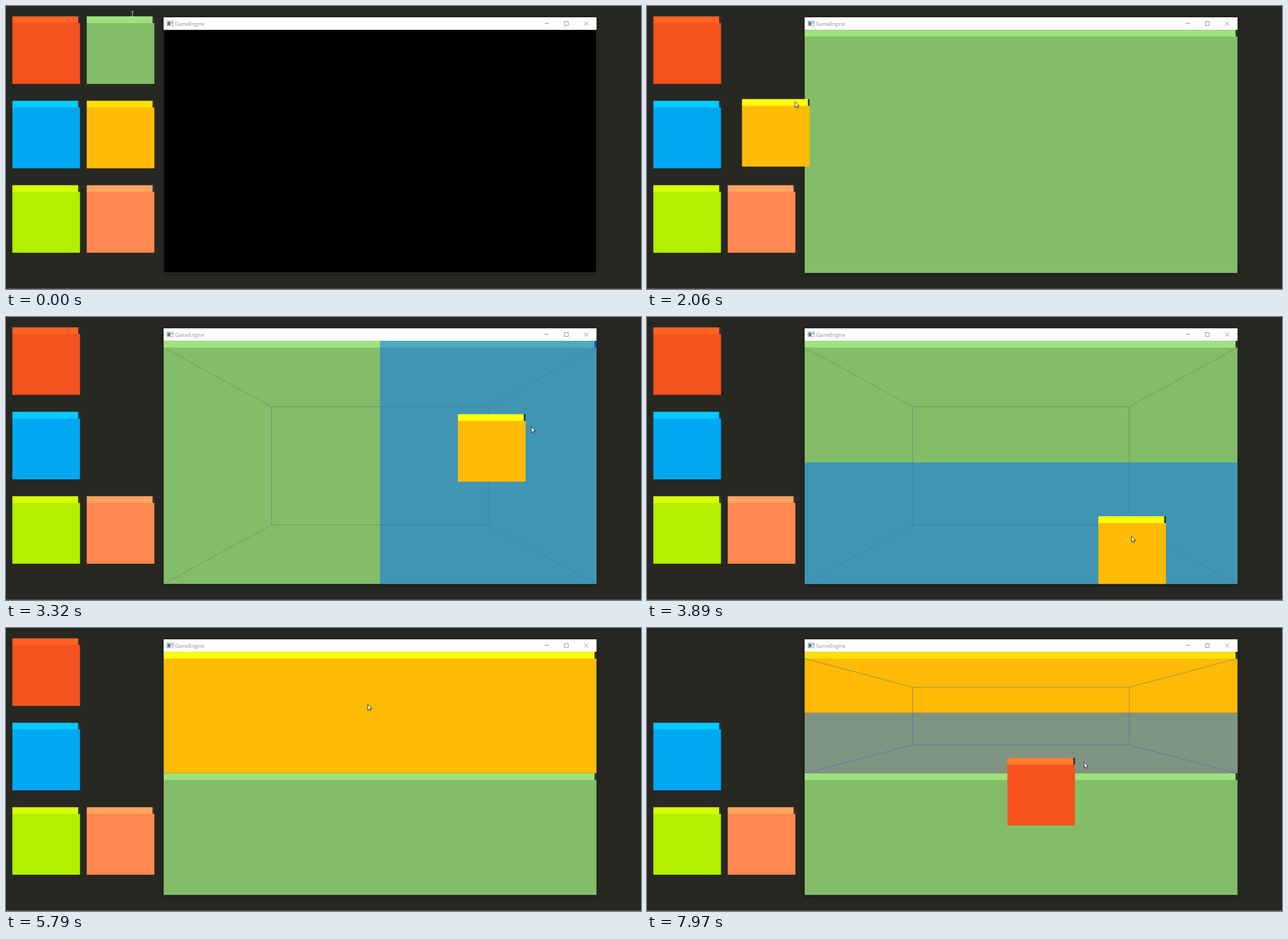
These frames come from a looping animation (1120x500 px, 8 s). An HTML page:

```html
<!DOCTYPE html>
<html lang="en">
<head>
<meta charset="utf-8">
<title>Docking panels</title>
<style>
  html, body { margin: 0; width: 100%; height: 100%; overflow: hidden; background: #272822; }
  svg { display: block; width: 1120px; height: 500px; }
  text { font: 8.7px "Open Sans", "Noto Sans", sans-serif; fill: #8c8c8c; }
</style>
</head>
<body>
<svg viewBox="0 0 1120 500">
  <defs>
    <filter id="shade" x="-5%" y="-5%" width="110%" height="112%">
      <feDropShadow dx="0" dy="2" stdDeviation="4" flood-color="#000" flood-opacity=".4"/>
    </filter>
  </defs>
  <rect width="1120" height="500" fill="#272822"/>
  <rect y="499" width="1120" height="1" fill="#60604e"/>
  <g id="shelf"></g>
  <rect x="278" y="20" width="763.5" height="452" fill="#3c3d39" filter="url(#shade)"/>
  <rect x="278.5" y="42" width="762.5" height="429" fill="#000"/>
  <rect x="278" y="20" width="763.5" height="22.2" fill="#fff"/>
  <rect x="284" y="26.5" width="11" height="8.5" fill="#fff" stroke="#8a9297" stroke-width=".8"/>
  <rect x="285" y="27.8" width="5" height="6.2" fill="#4f8587"/>
  <rect x="291.6" y="28" width="2" height="3" fill="#6f8f9f"/>
  <text x="298.3" y="34.6">GameEngine</text>
  <path d="M950 30.5h7.5M985 27.5h6.8v6.8h-6.8zM1020 27.5l7 7m0-7l-7 7" fill="none" stroke="#8a8a8a"/>
  <g id="scene"></g>
</svg>
<script>
const LOOP = 8000, LAG = 60;
const SIZE = 119.3, HEAD = 11.9, NOTCH = 3;
const LEFT = 278.1, TOP = 42.1, WIDE = 763.3, HIGH = 429.4;

// Shelf order, row by row; hover, pick and drop are times.
const panels = [
  { rgb: [245, 82, 30], hover: 6500, pick: 6620, drop: LOOP },
  { rgb: [132, 189, 104], hover: 340, pick: 410, drop: 1200 },
  { rgb: [0, 168, 243] },
  { rgb: [255, 187, 5], hover: 1630, pick: 1940, drop: 5790 },
  { rgb: [179, 240, 0] },
  { rgb: [255, 136, 80] }
];
panels.forEach((q, i) => {
  q.home = [11.2 + 131.2 * (i % 2), 18.3 + 149.15 * Math.floor(i / 2)];
});
const [red, green, , yellow] = panels;

// Pointer route: time, x, y and an optional rest.
const route = [
  [0, 223, 14, 260], [410, 234, 23], [1200, 540, 165], [1690, 232, 172, 250],
  [2000, 257, 169], [2060, 261, 169], [2350, 372, 200, 160],
  [2770, 506, 137], [2830, 508, 132], [3050, 690, 120], [3390, 945, 203, 250],
  [3830, 886, 356], [3890, 855, 387], [4450, 640, 428], [5250, 636, 194],
  [5550, 638, 135, 270], [6540, 121, 23, 80],
  [7150, 435, 152], [7210, 463, 152], [7480, 590, 86], [7910, 745, 234], [7970, 771, 237]
];
const knots = route.flatMap(([t, x, y, rest]) => rest ? [[t, x, y], [t + rest, x, y]] : [[t, x, y]]);

// Harmonic slope: zero at turns and rests, so nothing overshoots.
function slope(i, k) {
  if (i < 1 || i > knots.length - 2) return 0;
  const rate = j => (knots[j + 1][k] - knots[j][k]) / (knots[j + 1][0] - knots[j][0]);
  const a = rate(i - 1), b = rate(i);
  return a * b > 0 ? 2 * a * b / (a + b) : 0;
}

function pointer(t) {
  const next = knots.findIndex(p => p[0] > t);
  if (next < 0) return knots[knots.length - 1].slice(1);
  const i = next - 1, a = knots[i], b = knots[next], d = b[0] - a[0];
  const s = (t - a[0]) / d, r = 1 - s;
  return [1, 2].map(k =>
    r * r * (1 + 2 * s) * a[k] + s * s * (3 - 2 * s) * b[k] +
    d * s * r * (r * slope(i, k) - s * slope(next, k)));
}

const tint = (rgb, f) => `rgb(${rgb.map(v => Math.min(255, Math.round(v * f)))})`;
const rect = (x, y, w, h, fill) =>
  `<rect x="${x}" y="${y}" width="${w}" height="${h}" fill="${fill}"/>`;
const within = (p, x, y, w, h) => p[0] >= x && p[0] < x + w && p[1] >= y && p[1] < y + h;

// The body reaches slightly under the header to leave no seam.
function drawPanel(rgb, hot, x, y, w = SIZE, h = SIZE) {
  return rect(x, y + HEAD - .5, w, h - HEAD + .5, tint(rgb, 1)) +
    rect(x, y, w - NOTCH, HEAD, tint(rgb, hot ? 1.5 : 1.2)) +
    rect(x + w - NOTCH, y, NOTCH, HEAD, "#303336");
}

// Split guides of a docked panel, with the half under the pointer tinted.
function drawGuides(p, y, h) {
  const top = y + HEAD, bodyHigh = h - HEAD, right = LEFT + WIDE, end = y + h;
  const snap = v => Math.floor(v) + .5;
  const x1 = snap(LEFT + WIDE / 4), x2 = snap(right - WIDE / 4);
  const y1 = snap(top + bodyHigh / 4), y2 = snap(end - bodyHigh / 4);
  const u = (p[0] - LEFT) / WIDE, v = (p[1] - top) / bodyHigh;
  const gaps = [u, v, 1 - u, 1 - v], near = Math.min(...gaps);
  const halves = [
    [LEFT, y, WIDE / 2, h], [LEFT, y, WIDE, h / 2],
    [LEFT + WIDE / 2, y, WIDE / 2, h], [LEFT, y + h / 2, WIDE, h / 2]
  ];
  const lines = `<path d="M${x1} ${y1}H${x2}V${y2}H${x1}ZM${LEFT} ${top}L${x1} ${y1}M${right} ${top}L${x2} ${y1}` +
    `M${LEFT} ${end}L${x1} ${y2}M${right} ${end}L${x2} ${y2}" fill="none" stroke="#777d80" stroke-width=".8"/>`;
  return lines + (near < .25 ? rect(...halves[gaps.indexOf(near)], "rgba(0,111,255,.5)") : "");
}

function drawPointer([x, y], arrow) {
  const shape = arrow
    ? `<path d="M0 0V10.3L2.4 8.1L4 11.7L5.7 11L4.1 7.4H7.2Z" fill="#fff" stroke="#000" stroke-width=".8"/>`
    : `<path d="M-2 -4.5H-.5L0 -4L.5 -4.5H2M0 -4V4M-2 4.5H-.5L0 4L.5 4.5H2" fill="none" stroke="#d8d8d4" stroke-width=".9"/>`;
  return `<g transform="translate(${x} ${y})">${shape}</g>`;
}

const shelf = document.getElementById("shelf"), scene = document.getElementById("scene");

function draw(t) {
  const p = pointer(t);
  const hot = [red, yellow, green].find(q => t >= q.hover);
  const held = panels.find(q => t >= q.pick && t < q.drop);
  const resting = panels.filter(q => !(t >= q.pick));
  const docked = [yellow, green].filter(q => t >= q.drop);
  let picture = "";

  docked.forEach((q, i) => {
    const h = HIGH / docked.length, y = TOP + i * h;
    picture += drawPanel(q.rgb, q === hot, LEFT, y, WIDE, h);
    if (held && within(p, LEFT, y, WIDE, h)) picture += drawGuides(p, y, h);
  });
  if (held) {
    const from = pointer(held.pick), to = pointer(Math.max(held.pick, t - LAG));
    picture += drawPanel(held.rgb, true, ...held.home.map((v, k) => v + to[k] - from[k]));
  }

  const arrow = held || within(p, LEFT, 20, WIDE, TOP + HIGH - 20) ||
    resting.some(q => within(p, ...q.home, SIZE, SIZE));
  shelf.innerHTML = resting.map(q => drawPanel(q.rgb, q === hot, ...q.home)).join("");
  scene.innerHTML = picture + drawPointer(p, arrow);
}

const begin = performance.now();
function tick() {
  draw((performance.now() - begin) % LOOP);
  requestAnimationFrame(tick);
}
tick();
</script>
</body>
</html>
```
